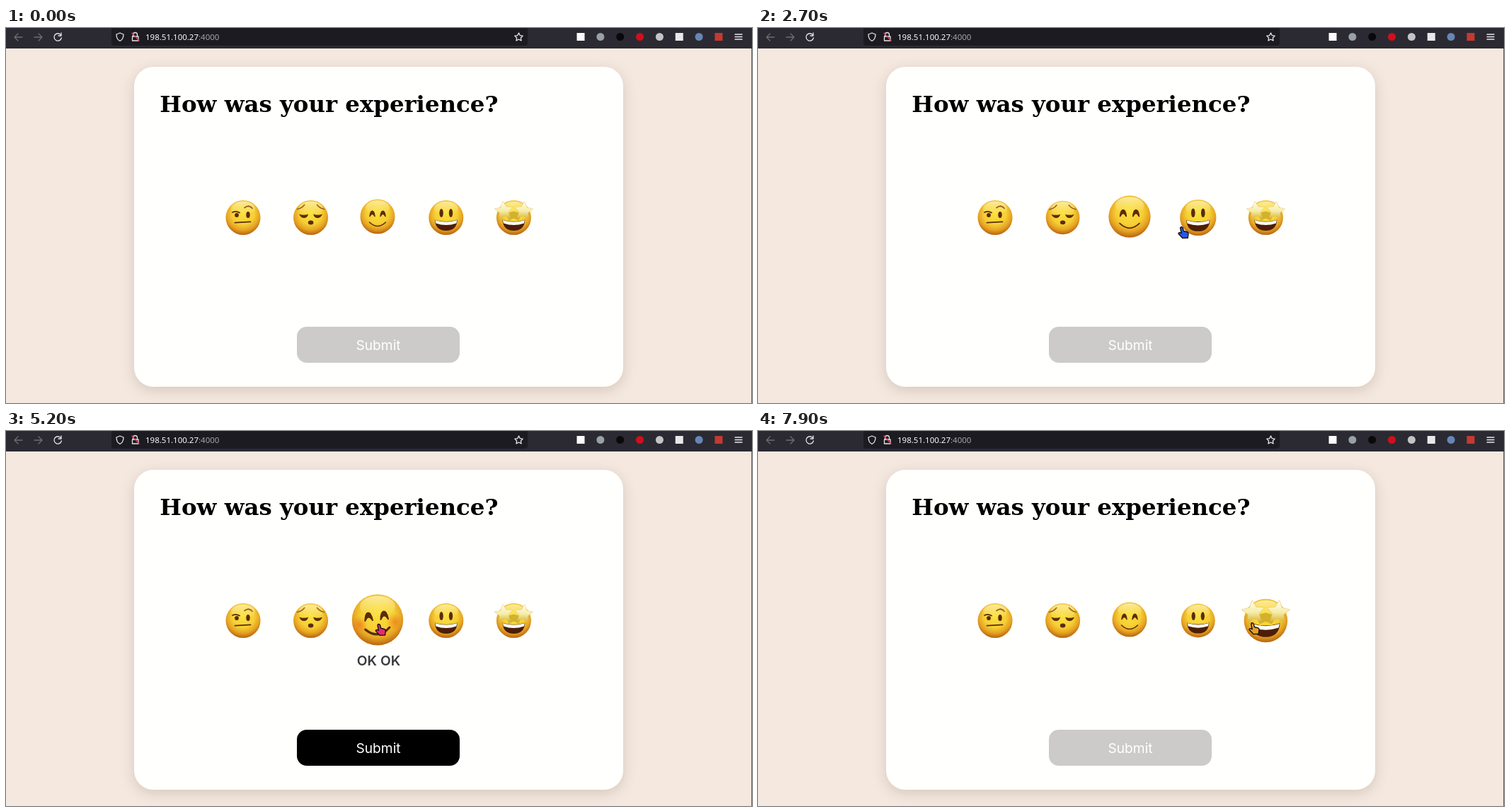
These frames come from a looping animation (1054 by 531 pixels, 8 s). An HTML page:

```html
<!DOCTYPE html>
<html lang="en">
<head>
<meta charset="utf-8">
<title>Feedback card</title>
<style>
  html, body { margin: 0; width: 100%; height: 100%; overflow: hidden; background: #f4e8df; }
  svg { display: block; width: 100%; height: 100%; }
  .card { filter: drop-shadow(0 5px 9px rgba(70, 40, 20, .17)); }
  .title { font: bold 32.4px "DejaVu Serif", serif; }
  .url { font: 11.5px "Noto Sans", sans-serif; }
  .ui { font: 19.2px Inter, sans-serif; text-anchor: middle; }
  .line, .stroke, .brow { fill: none; stroke-linecap: round; stroke-linejoin: round; }
  .brown { fill: #5a2c0c; }
  .stroke { stroke: #5a2c0c; stroke-width: 1.8; }
  .brow { stroke: #9a6420; stroke-width: 1.7; }
</style>
</head>
<body>
<svg viewBox="0 0 1054 531">
  <defs>
    <radialGradient id="skin" cx=".5" cy=".38" r=".64">
      <stop offset="0" stop-color="#fbe03c"/>
      <stop offset=".5" stop-color="#f6cf34"/>
      <stop offset=".75" stop-color="#e5a322"/>
      <stop offset="1" stop-color="#b25a0c"/>
    </radialGradient>
    <linearGradient id="shine" x2="0" y2="1">
      <stop offset="0" stop-color="#fffbd8" stop-opacity=".65"/>
      <stop offset="1" stop-color="#fff3a0" stop-opacity="0"/>
    </linearGradient>
    <linearGradient id="star" x2="0" y2="1">
      <stop offset="0" stop-color="#fffdee"/>
      <stop offset=".55" stop-color="#f6eca6"/>
      <stop offset="1" stop-color="#d5b033"/>
    </linearGradient>
    <radialGradient id="blush">
      <stop offset="0" stop-color="#ee7a1c" stop-opacity=".75"/>
      <stop offset="1" stop-color="#ee7a1c" stop-opacity="0"/>
    </radialGradient>
  </defs>

  <rect width="1054" height="531" fill="#f4e8df"/>
  <rect x="1053" y="28" width="1" height="503" fill="#6b6562"/>

  <!-- browser bar -->
  <rect width="1054" height="29" fill="#2b2a33"/>
  <path d="M149 0H737V21Q737 25 733 25H153Q149 25 149 21Z" fill="#1c1b22"/>
  <g class="line" stroke-width="1.3" stroke="#e6e6ea">
    <path d="M23 13H12M17 8L12 13L17 18M40 13H51M46 8L51 13L46 18" stroke="#6d6c75"/>
    <path d="M77.5 10A5.2 5.2 0 1 0 78.3 14M78 7V11H74"/>
    <path d="M161 7L166 9Q166 16 161 18.5Q156 16 156 9Z"/>
    <path d="M179.5 12V9.5A3 3 0 0 1 185.5 9.5V12M178.5 12H187V18H178.5Z"/>
    <path d="M178 7L188 18" stroke="#e8405c"/>
    <path id="bookmark"/>
    <path d="M1030 9H1040M1030 12.5H1040M1030 16H1040"/>
  </g>
  <text class="url" x="197" y="17" fill="#fbfbfe">198.51.100.27<tspan fill="#a5a4ab">:4000</tspan></text>
  <g id="addons"></g>

  <!-- card -->
  <rect class="card" x="181" y="55" width="691" height="453" rx="27" fill="#fffffd"/>
  <text class="title" x="217.3" y="118.5">How was your experience?</text>
  <rect id="button" x="411" y="423" width="230" height="51" rx="14"/>
  <text class="ui" x="526" y="456" fill="#fff">Submit</text>
  <text class="ui" id="label" x="526.5" y="332" font-weight="600" fill="#39383c" style="font-weight: 600">OK OK</text>
  <g id="faces"></g>
  <path id="cursor" stroke="#15120f" stroke-width="1.4" stroke-linejoin="round"/>
</svg>

<script>
const LOOP = 8000, STEP = 100;
const SELECT = 5100, DESELECT = 7200, CHOSEN = 2;
const HOVER_SCALE = 1.23, CHOSEN_SCALE = 1.5;
const HAND = 'M4.5 .8Q6.5 .3 7.3 2.3L8.3 6.5L13.2 7.7Q15.3 8.5 15 11L14.2 16.3L6.8 16.6L1.2 10.6Q.6 8.6 3 8.6L5.2 9.6L3.8 3Q3.5 1.3 4.5 .8Z';
const ARROW = 'M1 1L13 11L7.5 12L4 17Z';

// the pointer's stops: time, x, y
const stops = [
  [300, 502, 387], [1000, 300, 291], [1800, 340, 291], [1950, 399, 287], [2500, 440, 285],
  [2700, 593, 281], [3100, 625, 279], [3400, 683, 278], [4100, 692, 277], [4300, 620, 278],
  [4400, 615, 278], [4600, 522, 273], [7200, 519, 272], [7700, 655, 279], [7900, 693, 271]
];

const $ = id => document.getElementById(id);
const isSelected = t => t >= SELECT && t < DESELECT;
const mirror = shape => `${shape}<g transform="scale(-1 1)">${shape}</g>`;

function starPath(cx, cy, r, turn = 0) {
  const points = Array.from({ length: 10 }, (_, i) => {
    const a = turn + (i / 5 - .5) * Math.PI, d = i % 2 ? r / 2 : r;
    return `${cx + d * Math.cos(a)} ${cy + d * Math.sin(a)}`;
  });
  return `M${points.join('L')}Z`;
}

const grin = `
  <path d="M-16 3Q0 8 16 3Q15 18.5 0 18.5Q-15 18.5 -16 3Z" fill="#4c1e08"/>
  <path d="M-15.5 3.6Q0 8.6 15.5 3.6L14.5 8Q0 13 -14.5 8Z" fill="#fffdf4"/>`;

const features = [
  `<path class="brow" d="M2 -14Q8 -19 13 -13"/>
   <path class="stroke" d="M-15 -7.5Q-10 -10 -5 -7M-11.5 7.2L10.5 5.8"/>
   <circle class="brown" cx="-9" cy="-3.5" r="2.9"/>
   <ellipse class="brown" cx="7" cy="-4" rx="2.7" ry="4.5"/>`,
  mirror(`<path class="brow" d="M-19 -12Q-13 -13 -9 -18"/>
   <path class="brown" d="M-16.5 -5Q-10 -2.5 -3.5 -5Q-5 .5 -9.5 .5Q-14 .5 -16.5 -5Z"/>`) +
  '<ellipse class="brown" cy="7" rx="3.8" ry="3"/>',
  mirror(`<circle class="blush" cx="-17" cy="3" r="8" fill="url(#blush)"/>
   <path class="brown" d="M-11.8 0Q-11 -8.5 -7.5 -8.5Q-4 -8.5 -3.2 0Q-4 1 -4.9 -.5Q-7.5 -5.5 -10.1 -.5Q-11 1 -11.8 0Z"/>`) +
  '<path class="stroke" id="smile" d="M-11.5 8Q0 19 11.5 8"/>',
  mirror('<ellipse class="brown" cx="-6.7" cy="-6.5" rx="2.7" ry="6"/>') + grin,
  grin + '<path d="M-11 -6L0 -9L11 -6L7 4L0 1L-7 4Z" fill="#d4b12c"/>' +
  mirror(`<path d="${starPath(-14, -9.5, 13.7, -.1)}" fill="url(#star)" stroke="#d9bd55" stroke-width=".4"/>`)
];

const faces = features.map((_, i) => ({ x: 335 + 95.6 * i, y: i === CHOSEN ? 267 : 268.5, scales: [] }));
faces[CHOSEN].x = 525;

function pointer(t) {
  const i = stops.findIndex(s => s[0] > t);
  if (i <= 0) return stops.at(i).slice(1);
  const [t0, x0, y0] = stops[i - 1], [t1, x1, y1] = stops[i], u = (t - t0) / (t1 - t0);
  return [x0 + (x1 - x0) * u, y0 + (y1 - y0) * u];
}

function targetScale(i, t) {
  if (i === CHOSEN && isSelected(t)) return CHOSEN_SCALE;
  const [x, y] = pointer(t);
  return y < 300 && Math.abs(x + 5 - faces[i].x) < 48 ? HOVER_SCALE : 1;
}

// damped spring towards the hover or chosen size, kept once per step
faces.forEach((face, i) => {
  const dt = .005, stiffness = 480, damping = 24;
  let scale = 1, speed = 0;
  for (let ms = 0; ms < LOOP; ms += dt * 1000) {
    if (ms % STEP === 0) face.scales.push(scale);
    speed += (stiffness * (targetScale(i, ms) - scale) - damping * speed) * dt;
    scale += speed * dt;
  }
});

$('bookmark').setAttribute('d', starPath(724.5, 13, 6));
$('addons').innerHTML = ['#fbfbfe', '#9aa0a4', '#09090b', '#d0101c', '#c4c4c6', '#e8e8ea', '#6686b4', '#c43a30']
  .map((fill, i) => `<rect x="${806.5 + i * 27.85}" y="7" width="11" height="11" rx="${i % 7 % 5 ? 5.5 : 0}" fill="${fill}"/>`)
  .join('');
$('faces').innerHTML = features.map(f => `<g>
  <circle r="24.5" fill="url(#skin)"/>
  <ellipse cy="-13" rx="17" ry="10" fill="url(#shine)"/>
  <g>${f}</g></g>`).join('');
const nodes = [...$('faces').children];

function draw(t) {
  const selected = isSelected(t);
  // the chosen face nods and tilts slowly
  const nod = .5 - .5 * Math.cos((t - 5800) / 2200 * 2 * Math.PI);

  faces.forEach(({ x, y, scales }, i) => {
    const chosen = selected && i === CHOSEN;
    const lift = chosen ? 6 * nod - 3 : 0;
    nodes[i].setAttribute('transform', `translate(${x} ${y + lift}) scale(${scales[t / STEP]})`);
    nodes[i].lastElementChild.setAttribute('transform',
      chosen ? `translate(${-1.5 * nod} ${5 * nod - 2.5}) rotate(${-9 * nod})` : '');
  });
  document.querySelectorAll('.blush').forEach(b => b.style.opacity = +selected);
  $('smile').style.strokeWidth = selected ? 2.2 : 1.5;
  $('button').setAttribute('fill', selected ? '#000' : '#cccbca');
  $('label').style.opacity = +selected;

  // rainbow pointer that blinks off once per colour cycle
  const phase = ((t - 2000) / 1475 + 2) % 1;
  const [x, y] = pointer(t);
  const cursor = $('cursor');
  cursor.setAttribute('d', y > 300 ? ARROW : HAND);
  cursor.setAttribute('transform', `translate(${x} ${y})`);
  cursor.setAttribute('fill', `hsl(${37 - 360 * phase} 78% 53%)`);
  cursor.style.opacity = phase > .61 && phase < .66 ? 0 : 1;
}

function tick() {
  draw(Math.floor(performance.now() % LOOP / STEP) * STEP);
  requestAnimationFrame(tick);
}
tick();
</script>
</body>
</html>
```
